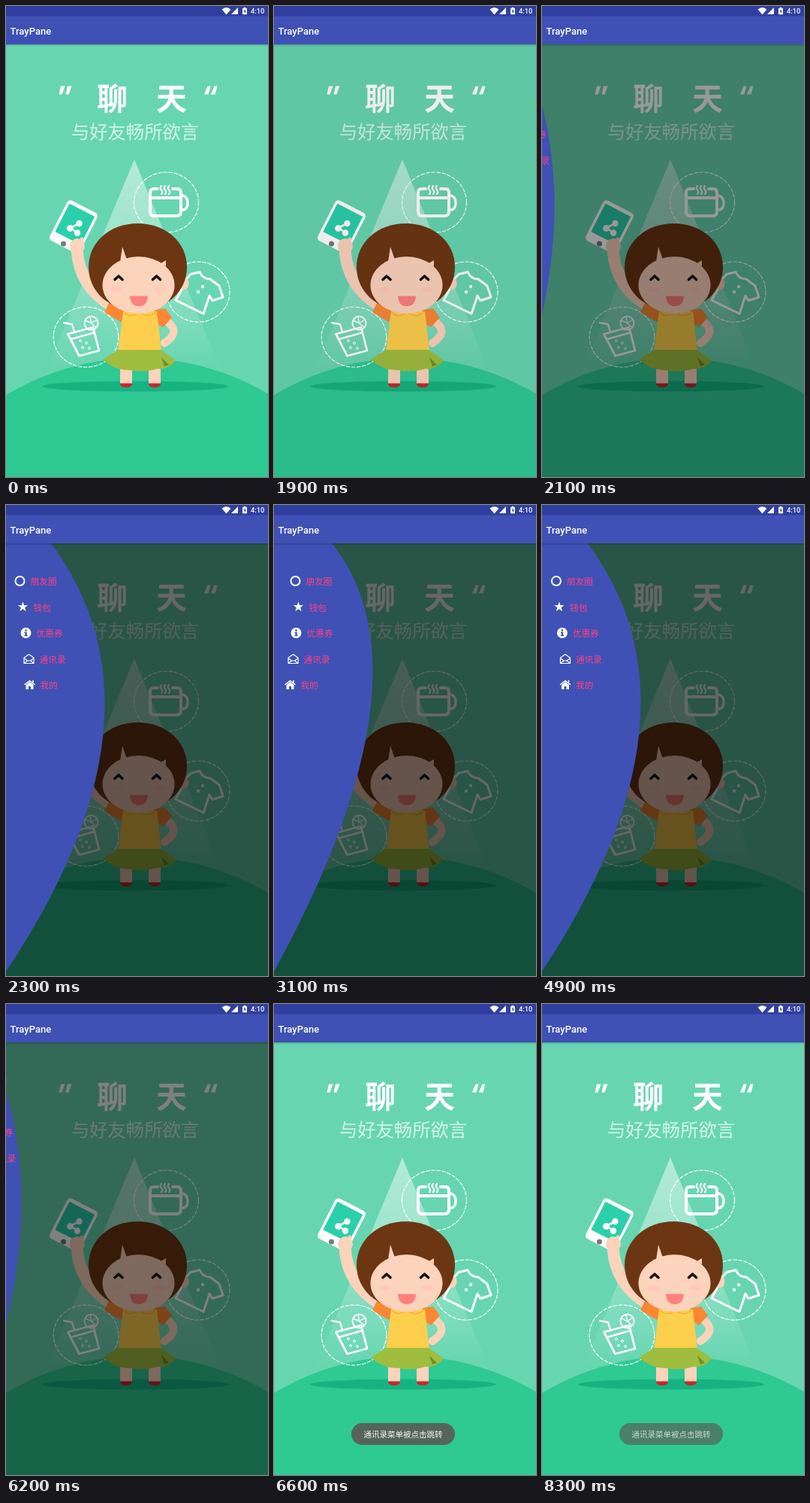
These frames come from a looping animation (349 px wide and 626 px high, 8.4 s). An HTML page with a canvas:

```html
<!DOCTYPE html>
<html lang="zh">
<head>
<meta charset="utf-8">
<title>Side menu</title>
<style>
html, body { margin: 0; width: 100%; height: 100%; overflow: hidden; background: #67d6b0; }
canvas { display: block; width: 349px; height: 626px; }
</style>
</head>
<body>
<canvas id="stage"></canvas>
<script>
const W = 349, H = 626, LOOP = 8400, BAR = 51;
const CJK = '"Noto Sans CJK SC", "Noto Sans CJK", sans-serif';
const SKIN = '#fcd3bb', BLUE = '#3f51b5';
const canvas = document.getElementById('stage');
const g = canvas.getContext('2d');
const dpr = window.devicePixelRatio || 1;
canvas.width = W * dpr;
canvas.height = H * dpr;

// [time, value] pairs, linear in between
const OPEN = [[1800, 0], [1900, .12], [2000, .38], [2100, .653], [2200, .88], [2300, 1],
  [6100, 1], [6200, .665], [6300, .38], [6400, .16], [6500, .04], [6600, 0]];
const DIM = [[1800, 0], [1900, .07], [2000, .23], [2100, .405], [2200, .53], [2300, .6],
  [6100, .6], [6200, .5], [6300, .28], [6400, .12], [6500, .03], [6600, 0]];
const TOUCH = [[2100, 227], [2500, 225], [2600, 216], [3100, 140], [3400, 105], [3700, 95],
  [3800, 95], [4600, 212], [4800, 212], [4900, 222], [5200, 238], [5500, 221]];
const TOAST = [[6300, 0], [6600, 1], [8100, 1], [8300, .74]];

function track(keys, t) {
  if (t <= keys[0][0]) return keys[0][1];
  for (let i = 1; i < keys.length; i++) {
    const [t0, a] = keys[i - 1], [t1, b] = keys[i];
    if (t <= t1) return a + (b - a) * (t - t0) / (t1 - t0);
  }
  return keys[keys.length - 1][1];
}

function fill(d, color) {
  g.fillStyle = color;
  g.fill(new Path2D(d));
}

function line(d, width, color = '#fff') {
  g.strokeStyle = color;
  g.lineWidth = width;
  g.stroke(new Path2D(d));
}

function oval(x, y, rx, ry, color) {
  g.beginPath();
  g.ellipse(x, y, rx, ry, 0, 0, 7);
  g.fillStyle = color;
  g.fill();
}

function ring(x, y, rx, ry, width) {
  g.beginPath();
  g.ellipse(x, y, rx, ry, 0, 0, 2 * Math.PI);
  g.strokeStyle = '#fff';
  g.lineWidth = width;
  g.stroke();
}

function box(x, y, w, h, r, color) {
  g.beginPath();
  g.roundRect(x, y, w, h, r);
  g.fillStyle = color;
  g.fill();
}

function text(s, x, y, font, color, align = 'left') {
  g.font = font;
  g.textAlign = align;
  g.fillStyle = color;
  g.fillText(s, x, y);
}

function backdrop() {
  g.fillStyle = '#67d6b0';
  g.fillRect(0, 0, W, H);
  const beam = g.createLinearGradient(0, 204, 0, 482);
  beam.addColorStop(0, 'rgba(255,255,255,.5)');
  beam.addColorStop(.5, 'rgba(255,255,255,.3)');
  beam.addColorStop(1, 'rgba(255,255,255,0)');
  fill('M171 204L285 482H55Z', beam);
  oval(176, 808, 340, 340, '#2fc994');
  oval(172, 505.5, 124, 7, '#16b380');

  fill('M73 106.500h5.500l-4 11h-4zM82 106.500h5.500l-4 11h-4z', '#fff');
  fill('M268.500 106.500h4l-3 11h-5.500zM277.500 106.500h4l-3 11h-5.500z', '#fff');
  text('聊', 141.5, 138, '900 41px ' + CJK, '#fff', 'center');
  text('天', 220.5, 138, '900 41px ' + CJK, '#fff', 'center');
  text('与好友畅所欲言', 172, 175.5, '300 24.3px ' + CJK, '#d4f4e8', 'center');
}

function bubbles() {
  g.setLineDash([4.5, 2.6]);
  ring(213.5, 261, 43, 40, 1.2);
  ring(256, 380, 42, 40, 1.2);
  ring(106.5, 440, 43.3, 40, 1.2);
  g.setLineDash([]);

  // cup
  line('M202 243H197Q192 243 192 248V273Q192 279 198 279H227Q233 279 233 273V248Q233 243 228 243H222M193 255H232', 4);
  line('M233 252H236Q242 254 242 262T236 271H233', 3.4);
  for (const x of [207, 212, 217]) line(`M${x} 239q-2.5 3 0 5.500t0 5.500`, 2.2);

  // shirt
  line('M241 362L246 356.500L258 353.500Q262 363 272 363L284 372L289 387L275 391.500L271 385L263 409L226 391L238 369Z', 3);
  oval(262, 373, 2.2, 2.2, '#fff');
  oval(256, 380, 2.2, 2.2, '#fff');

  // drink
  line('M82.500 436L116 427L124 458L97.500 465ZM86 443L118 434', 2.8);
  line('M77 421L88 423L91 433', 2.4);
  ring(113.5, 421.5, 9, 9, 2);
  line('M113.5 421.5L106 418M113.5 421.5L112 413M113.5 421.5L121 417M113.5 421.5L120 427', 1.4);
  for (const [x, y] of [[99, 445], [107, 448], [102, 454], [111, 455]]) ring(x, y, 1.5, 1.5, 1);
}

function phone() {
  g.save();
  g.translate(90, 293.5);
  g.rotate(27 * Math.PI / 180);
  box(-22.5, -30, 45, 60, 5, '#fff');
  box(-19, -25, 38, 42, 1, '#2bd0ab');
  g.restore();
  oval(76.5, 316, 3.5, 3.5, '#777b7b');
  line('M97.500 289L85.500 295L95 301', 2.6);
  oval(97.5, 289, 4.2, 4.2, '#fff');
  oval(85.5, 295.5, 4.4, 4.4, '#fff');
  oval(95, 301.5, 4.2, 4.2, '#fff');
}

function girl() {
  oval(237.5, 369, 6, 8, SKIN);
  line('M94.500 324Q98 374 142 399', 16, SKIN);
  oval(95, 319, 10, 10, SKIN);
  line('M99 314L101 310', 5, SKIN);
  line('M214 419Q234 433 211 448', 10.5, SKIN);

  g.fillStyle = SKIN;
  g.fillRect(152, 478, 16, 25);
  g.fillRect(190, 478, 16, 25);
  for (const x of [152, 190]) fill(`M${x} 501.5h16v1q-1 4.500-8 4.500t-8-4.500z`, '#c9272d');

  fill('M138 393L160 407L153 420L131 407Z', '#fb8733');
  fill('M198 404L212 402L221 414L209 427L200 421Z', '#fb8733');
  fill('M156 406L149 460H207L201 406Z', '#fecf4c');
  fill('M149 457H206L226 471Q216 484 202 482Q182 488 166 484Q146 485 129 470Z', '#9fbd3f');
  fill('M207 467L217 477L211 479Z', '#6f8f2a');
  line('M158 407Q164 416 177 407Q190 416 199 407', 1.5, '#fbb03b');

  fill('M175.500 289C213 289 241 314 241 347S213 405 175.500 405S110 380 110 347S138 289 175.500 289Z', '#6d3613');
  oval(176.5, 371, 48, 38, SKIN);
  fill('M155 320L152 340L161 337Z', SKIN);
  fill('M206 342L213 338L213 346Z', SKIN);
  for (const x of [150, 200.5]) {
    line(`M${x - 5} 363.500l5-4.500l5 4.500`, 3.6, '#111');
  }
  oval(148, 377, 8, 3.6, '#fec9bb');
  oval(204, 377, 8, 3.6, '#fec9bb');
  fill('M165 385.500H189Q188 399 177 399T165 385.500Z', '#ff807c');
}

const icons = [
  () => ring(0, 0, 6, 6, 2),
  () => {
    g.beginPath();
    for (let i = 0; i < 10; i++) {
      const r = i % 2 ? 2.8 : 7, a = i * Math.PI / 5;
      g.lineTo(r * Math.sin(a), -r * Math.cos(a));
    }
    g.fillStyle = '#fff';
    g.fill();
  },
  () => {
    oval(0, 0, 7, 7, '#fff');
    fill('M-1.200-4.500h2.400v2.200h-2.400zM-2-1.200h3.200v4h1v1.400h-4.200v-1.400h1v-2.600h-1z', BLUE);
  },
  () => line('M-6.500-1.500L0-6L6.500-1.500V6H-6.500ZM-6.500-1L-2 2.500H2L6.500-1M-6 5.500L-2 2.500M6 5.500L2 2.500', 1.2),
  () => {
    fill('M-5 0L0-4L5 0V6H1.500V2H-1.500V6H-5Z', '#fff');
    line('M-6.500-.5L0-5.500L6.500-.5M4.500-5.500V-3', 1.500);
  }
];
const labels = ['朋友圈', '钱包', '优惠券', '通讯录', '我的'];

function drawer(open, touch) {
  g.save();
  g.translate(-200 * (1 - open), 0);
  g.beginPath();
  g.moveTo(-60, -15);
  g.lineTo(0, -15);
  g.quadraticCurveTo(263 * open, touch, 0, 620);
  g.lineTo(-60, 620);
  g.fillStyle = BLUE;
  g.fill();
  labels.forEach((label, i) => {
    const y = 101 + 34.5 * i;
    const x = 33 - .116 * Math.abs(y - touch);
    g.save();
    g.translate(x, y);
    icons[i]();
    text(label, 14, 5, '11.700px ' + CJK, '#ff4081');
    g.restore();
  });
  g.restore();
}

function bars() {
  const shade = g.createLinearGradient(0, BAR, 0, BAR + 3);
  shade.addColorStop(0, 'rgba(0,0,0,.2)');
  shade.addColorStop(1, 'rgba(0,0,0,0)');
  g.fillStyle = shade;
  g.fillRect(0, BAR, W, 3);
  g.fillStyle = BLUE;
  g.fillRect(0, 0, W, BAR);
  g.fillStyle = '#303f9f';
  g.fillRect(0, 0, W, 13.5);
  text('TrayPane', 5.5, 38, '500 13px Roboto, sans-serif', '#fff');
  fill('M287.500 4.500Q293.500-.5 299.500 4.500L293.500 11.500Z', '#fff');
  fill('M309 2V11H300Z', '#fff');
  box(315, 2.8, 6, 8.4, .8, '#fff');
  box(316.8, 1.8, 2.4, 2, 0, '#fff');
  fill('M318.500 4L316.500 7.500H318V10L320 6.500H318.500Z', '#303f9f');
  text('4:10', 326, 10.3, '500 9.300px Roboto, sans-serif', '#fff');
}

function toast(alpha) {
  g.save();
  g.globalAlpha = alpha;
  box(103, 557, 138, 29, 14.5, '#55655d');
  text('通讯录菜单被点击跳转', 172, 575.5, '10.500px ' + CJK, '#f4f6f5', 'center');
  g.restore();
}

function draw(now) {
  const t = Math.floor(now % LOOP / 100) * 100;
  const open = track(OPEN, t), dim = track(DIM, t), note = track(TOAST, t);
  g.setTransform(dpr, 0, 0, dpr, 0, 0);
  g.lineCap = g.lineJoin = 'round';
  backdrop();
  bubbles();
  phone();
  girl();
  if (dim > 0) {
    g.fillStyle = `rgba(0,0,0,${dim})`;
    g.fillRect(0, BAR, W, H - BAR);
  }
  if (open > 0) drawer(open, track(TOUCH, t));
  bars();
  if (note > 0) toast(note);
}

const start = performance.now();
function loop() {
  draw(performance.now() - start);
  requestAnimationFrame(loop);
}
loop();
</script>
</body>
</html>
```
